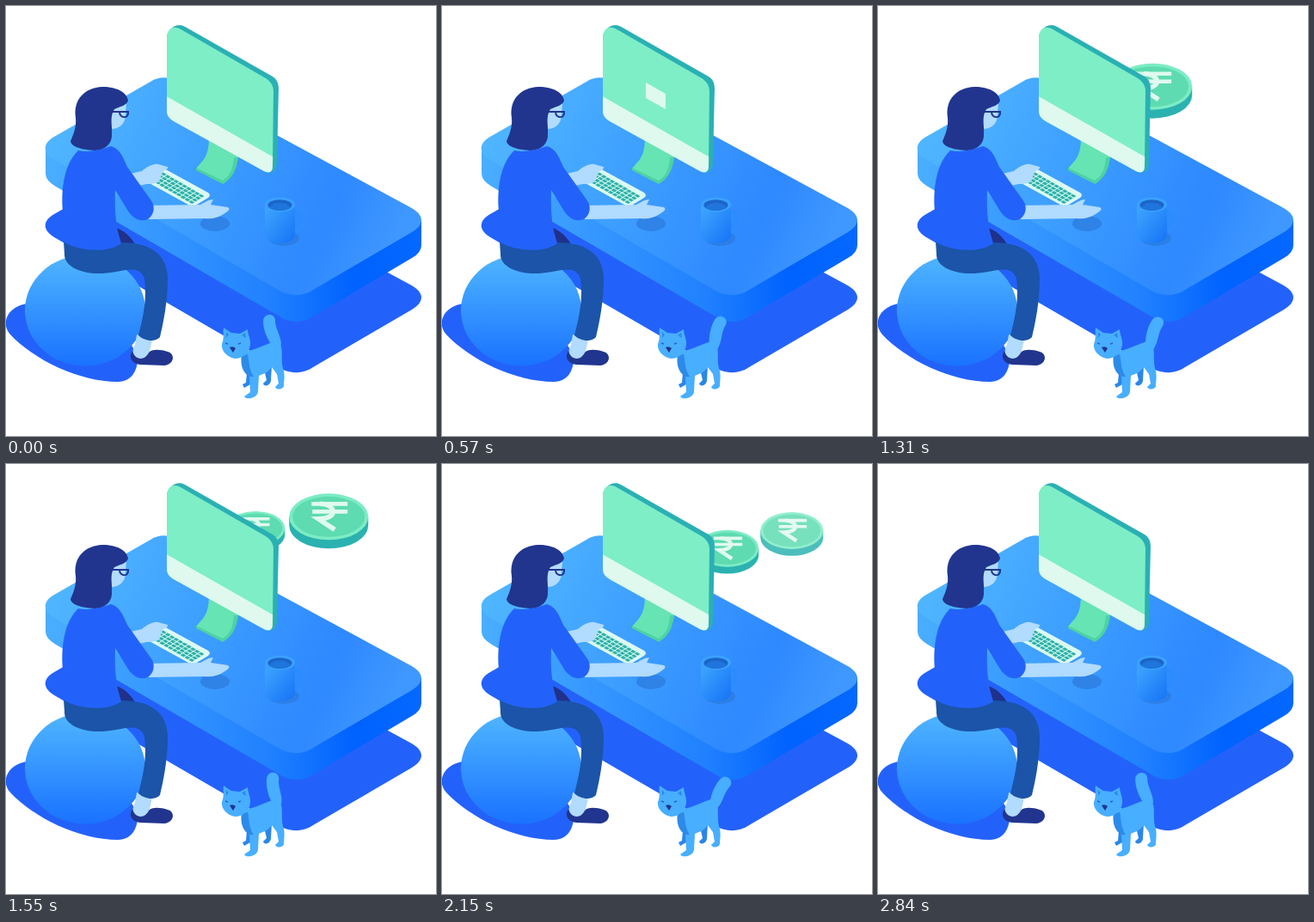
An HTML page that plays this animation: 500 px wide and 500 px high, repeating every 2870 ms.

```html
<!DOCTYPE html>
<html lang="en">
<head>
<meta charset="utf-8">
<title>Working at a desk</title>
<style>
html, body { margin: 0; width: 100%; height: 100%; overflow: hidden; background: #fff; }
svg { display: block; width: 100vw; height: 100vh; }
</style>
</head>
<body>
<svg viewBox="0 0 500 500">
  <defs>
    <linearGradient id="deskTop" gradientUnits="userSpaceOnUse" x1="60" y1="130" x2="440" y2="300">
      <stop offset="0" stop-color="#50b6ff"/><stop offset=".45" stop-color="#3c9dff"/>
      <stop offset=".8" stop-color="#2e88ff"/><stop offset="1" stop-color="#3f98ff"/>
    </linearGradient>
    <linearGradient id="deskSide" gradientUnits="userSpaceOnUse" x1="46" y1="0" x2="483" y2="0">
      <stop offset="0" stop-color="#4aaeff"/><stop offset=".6" stop-color="#2080ff"/>
      <stop offset=".82" stop-color="#0062ff"/><stop offset="1" stop-color="#0568ff"/>
    </linearGradient>
    <linearGradient id="ball" x1="0" y1="0" x2="0" y2="1">
      <stop offset="0" stop-color="#4fb6ff"/><stop offset="1" stop-color="#1a72ff"/>
    </linearGradient>
    <linearGradient id="mug" x1="0" y1="0" x2="1" y2="1">
      <stop offset="0" stop-color="#3fa8ff"/><stop offset="1" stop-color="#1672f6"/>
    </linearGradient>
    <path id="slab" d="M56 152 L168 88 C177 82 189 82 198 87 L470 234 C487 243 487 254 472 263 L357 330 C346 338 330 338 318 331 L58 180 C42 171 42 160 56 152Z"/>
    <clipPath id="screenClip"><path d="M187 37 C187 27 194 22 203 27 L302 84 C308 88 311 93 311 99 L310 186 C310 193 306 195 300 192 L195 134 C189 130 187 127 187 121Z"/></clipPath>
    <clipPath id="steamClip"><rect id="steamBox" x="300" width="40" height="50"/></clipPath>
    <g id="coin">
      <path d="M-46 0 V10 A46 27 0 0 0 46 10 V0Z" fill="#2bb2b0"/>
      <ellipse rx="46" ry="27" fill="#7cecc4"/>
      <ellipse rx="42" ry="23.5" fill="#5edbb0"/>
      <g fill="none" stroke="#e0faf0" stroke-width="4.6">
        <path d="M-20 -15 H22 M-19 -6 H22"/>
        <path d="M-10 -15 C8 -15 13 2 -12 2.5 L7 15" stroke-width="5.5"/>
      </g>
    </g>
  </defs>

  <use href="#slab" y="90" fill="#2362fa"/>
  <path d="M24 346 C2 350 -7 368 5 382 C32 411 85 437 130 437 C147 436 152 425 154 408 L120 350Z" fill="#2362fa"/>

  <path d="M46 166 V195 Q46 203 58 210 L318 361 C330 369 346 369 357 361 L472 293 Q483 287 483 278 V249Z" fill="url(#deskSide)"/>
  <use href="#slab" fill="url(#deskTop)"/>

  <g id="coins"></g>

  <g>
    <path d="M236 152 C236 170 232 177 226 183 L221 189 L252 205 C264 198 269 186 270 172Z" fill="#66e4b4"/>
    <path d="M221 188 V191 L252 207 C264 200 268 190 270 176 L265 176 C264 190 260 198 252 203Z" fill="#4ed2a2"/>
    <path d="M187 37 C187 28 198 18 208 24 L310 82 C315 85 317 90 317 96 L315 183 C315 190 309 196 302 193Z" fill="#2ab0b4"/>
    <g clip-path="url(#screenClip)">
      <rect x="180" y="15" width="140" height="185" fill="#7eeec6"/>
      <path d="M185 104 L313 177 V200 H185Z" fill="#dff9ee"/>
    </g>
    <path id="note" d="M237 89 L260 102 V120 L237 107Z" fill="#dff9ee"/>
  </g>

  <path d="M182 188 L235 217 Q239 220 235 223 L220 232 Q216 234 212 231 L163 204Z" fill="#dcfaf0"/>
  <g id="keys" transform="matrix(.87 .5 -.82 .52 183.500 192)" fill="#2bb1aa"></g>

  <ellipse cx="323" cy="270" rx="18" ry="9" fill="#2b7fe6"/>
  <path d="M334 240 C345 235 344 257 334 257" fill="none" stroke="#2a8cff" stroke-width="4"/>
  <path d="M301 231 V267 C303 279 334 279 336 267 V231Z" fill="url(#mug)"/>
  <ellipse cx="318.500" cy="231" rx="17.500" ry="8.500" fill="#3aa2ff"/>
  <ellipse cx="318.500" cy="231.500" rx="14" ry="6.300" fill="#1c64c8"/>
  <path d="M306 234 C311 227 326 227 331 234 C325 239 312 239 306 234Z" fill="#1f75dc"/>
  <g clip-path="url(#steamClip)" fill="#8fcaff">
    <path d="M309 231 C310 225 313 223 318 223 L329 224 Q331 229 326 232Z" opacity=".5"/>
    <path d="M316 224 C312 216 324 216 319 207 C329 210 331 217 326 224Z" opacity=".3"/>
  </g>

  <path id="backArm" d="M132 198 L158 192 C164 187 171 183 177 184 L188 187 C189 190 184 191 182 193 L178 204 C173 208 165 206 159 208 L146 211Z" fill="#b1dbff"/>

  <ellipse cx="92" cy="354" rx="70" ry="64.500" fill="url(#ball)"/>
  <path d="M128 258 C146 264 158 284 156 308 L136 302Z" fill="#20318a"/>

  <path d="M152 382 L170 388 L166 406 L154 412 C145 407 147 400 150 394Z" fill="#b1dbff"/>
  <path d="M147 401 C142 408 146 416 156 417 L184 418 C196 417 197 404 188 402 C179 399 169 399 166 403 C161 413 150 412 147 401Z" fill="#21358f"/>
  <path d="M67 274 C85 286 115 284 134 275 C167 275 187 288 188 316 C188 345 183 368 179 385 C173 392 160 389 154 383 C160 360 164 340 161 317 C155 299 137 309 112 311 C88 312 67 303 68 288Z" fill="#1b54a8"/>

  <ellipse id="handShade" cx="243" cy="253" rx="17" ry="9" fill="#2f82e6"/>
  <path id="frontArm" d="M164 232 L226 231 C232 228 236 225 241 225 L238 231 L258 234 C262 237 257 239 253 242 C247 246 240 248 230 247 L166 248Z" fill="#b1dbff"/>
  <path d="M84 168 C98 171 112 166 122 163 C133 166 137 178 141 187 L168 225 C176 235 170 248 161 249 C153 250 148 246 143 240 L127 214 C126 235 128 252 130 262 L134 276 C120 287 88 286 68 275 L66 238 C64 215 67 184 84 168Z" fill="#2362fa"/>

  <path d="M122 117 L140 113 L139 126 C139 136 133 143 122 143Z" fill="#b1dbff"/>
  <path d="M81 130 C78 108 92 95 112 94 C130 94 141 101 142 110 C140 116 132 117 126 120 C120 129 124 140 123 148 C124 160 116 167 103 168 C88 167 76 164 75 157 C79 148 82 140 81 130Z" fill="#21358f"/>
  <path d="M122 123 H142 C143 131 133 131 132 124" fill="none" stroke="#21358f" stroke-width="2"/>

  <g fill="#48aeff">
    <path d="M280 427 C287 430 288 434 284 440 L277 444 L275 440 L279 438Z M300 422 L309 418 L308 436 C307 442 300 443 299 439 L303 435Z" fill="#2a86e8"/>
    <path id="tail" d="M311 397 C303 387 299 376 299 366 C300 357 312 357 313 365 C313 376 320 383 320 394Z"/>
    <path d="M275 402 C290 401 303 392 316 389 C324 397 319 409 322 421 C325 429 323 436 323 442 C322 446 315 447 313 443 L317 439 L315 428 L309 420 C304 427 298 428 294 430 L293 449 C291 457 279 458 277 454 L284 449 L283 431 C275 424 272 414 275 402Z"/>
    <path d="M274 406 C272 418 276 427 283 431 L288 431 C282 423 283 412 281 405Z" fill="#2c8ae8"/>
    <path d="M253 374 L262 380 L272 381 L281 376 C281 382 285 388 284 394 C283 404 275 410 266 410 C256 408 250 400 251 393 C254 386 252 380 253 374Z"/>
    <path d="M256 379 L259 382 L256 386Z M278 380 L274 383 L279 386Z" fill="#2c8ae8"/>
    <path d="M260 397 Q264 395 267 398 L264 403Z" fill="#21358f"/>
    <path d="M255 392 L258 393 M270 393 L273 392" stroke="#2565c8" stroke-width="1.500"/>
  </g>
</svg>

<script>
const NS = 'http://www.w3.org/2000/svg';
const LOOP = 2870;
const $ = id => document.getElementById(id);

function add(parent, tag, attrs) {
  const el = document.createElementNS(NS, tag);
  for (const k in attrs) el.setAttribute(k, attrs[k]);
  return parent.appendChild(el);
}

for (let row = 0; row < 4; row++)
  for (let col = 0; col < 10; col++)
    add($('keys'), 'rect', { x: 1 + col * 5.6, y: 2 + row * 4.6, width: 4.5, height: 3.5 });

// Each coin passes x, y at time t and slides along the isometric axis.
const coins = [
  { x: 290, y: 75, t: 1550, r: 34, from: 1250, to: 1810 },
  { x: 375, y: 61.5, t: 1550, r: 46, from: 1070, to: 1690 },
  { x: 394.5, y: 62, t: 2420, r: 36.5, from: 1960, to: 2570 },
  { x: 343.5, y: 114, t: 1880, r: 36.5, from: 1640, to: 2210 }
];
for (const c of coins) c.el = add($('coins'), 'use', { href: '#coin' });

const clamp = v => Math.max(0, Math.min(1, v));
const ease = v => (1 - Math.cos(Math.PI * clamp(v))) / 2;
const ramp = (t, a, b) => ease((t - a) / (b - a));
const turn = (id, deg, x, y) => $(id).setAttribute('transform', `rotate(${deg} ${x} ${y})`);

function draw(t) {
  const swing = ramp(t, 100, 900) - ramp(t, 1070, 1715) + ramp(t, 1715, 2290) - ramp(t, 2290, 2870);
  turn('tail', 51 * swing, 312, 397);

  const beat = t < 855 ? Math.sin(2 * Math.PI * t / 285) : 0;
  turn('frontArm', 1.4 * beat, 164, 240);
  turn('backArm', -2.2 * beat, 130, 205);
  $('handShade').setAttribute('rx', 17 + beat * .6);

  $('note').setAttribute('opacity', ramp(t, 300, 450) - ramp(t, 750, 890));

  for (const c of coins) {
    const dx = (t - c.t) * 7 / 30;
    c.el.setAttribute('transform', `translate(${c.x + dx} ${c.y - dx * .577}) scale(${c.r / 46})`);
    c.el.setAttribute('opacity', t < c.from ? 0 : clamp((c.to - t) / 70));
  }

  const steam = ramp(t, 2150, 2390) - ramp(t, 2450, 2750);
  $('steamBox').setAttribute('y', 234 - 29 * steam);
}

const start = performance.now();
function tick() {
  draw((performance.now() - start) % LOOP);
  requestAnimationFrame(tick);
}
tick();
</script>
</body>
</html>
```
